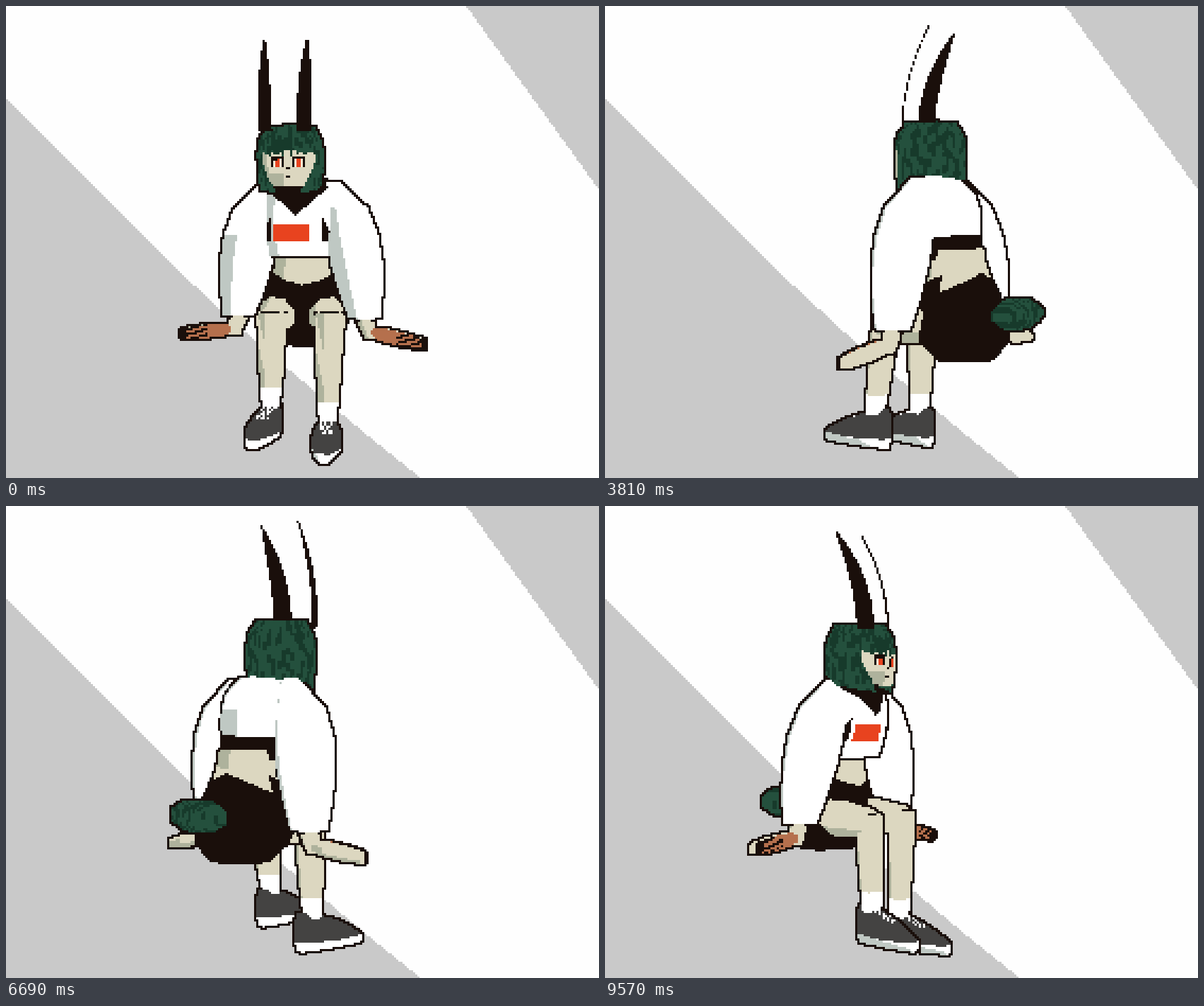
Recreate the animation shown at these times as an HTML page with a canvas. Size 839 px wide and 668 px high, loop 9.67 s.

```html
<!DOCTYPE html>
<html>
<head>
<meta charset="utf-8">
<style>
html, body { margin: 0; width: 100%; height: 100%; overflow: hidden; background: #fff; }
canvas { position: absolute; left: 0; top: 0; width: 840px; height: 669px; image-rendering: pixelated; }
</style>
</head>
<body>
<canvas id="view" width="280" height="223"></canvas>
<script>
const W = 280, H = 223, CELL = 3, LOOP = 9670;
const AXIS = 411, HORIZON = 300, CAMERA = 1700;
const ctx = document.getElementById('view').getContext('2d');
const image = ctx.createImageData(W, H);
const pixels = new Uint32Array(image.data.buffer);
const ids = new Uint8Array(W * H), depth = new Float32Array(W * H);

const rgb = h => (255 << 24 | (h & 255) << 16 | (h >> 8 & 255) << 8 | h >> 16) >>> 0;
const PAPER = rgb(0xfefefe), GREY = rgb(0xc9c9c9), INK = rgb(0x1a0f0b);
const WHITE = rgb(0xffffff), FOLD = rgb(0xbfc8c3), SKIN = rgb(0xdcd7c0), SKIN_DIM = rgb(0xaeb29c);
const HAIR = rgb(0x24503d), HAIR_DIM = rgb(0x173a2b), RED = rgb(0xe8431f);
const SHOE = rgb(0x444342), PALM = rgb(0xb5704d), CREAM = rgb(0xf3ead4);

const { abs, floor, min, max, PI } = Math;
const wave = u => Math.sin(PI * u);
const mix = (a, b, u) => a + (b - a) * u;

function hash(a, b = 0) {
  const v = Math.sin(a * 12.9898 + b * 78.233) * 43758.5453;
  return v - floor(v);
}

// Poses are held on a 30 ms grid, eight to a bar
const bars = [150, 1200, 2250, 3390, 4500, 5610, 6690, 7830, 8940, 9948];
const steps = [0];
for (let i = 0; i < 70; i++) {
  const bar = floor(i / 8);
  steps.push(Math.round(mix(bars[bar], bars[bar + 1], i % 8 / 8) / 30) * 30);
}

const slope = [[0, 132], [243, 374], [350, 472], [508, 605], [587, 668]];
function slopeY(x) {
  let i = 1;
  while (i < slope.length - 1 && x > slope[i][0]) i++;
  const [a, b] = [slope[i - 1], slope[i]];
  return mix(a[1], b[1], (x - a[0]) / (b[0] - a[0]));
}
const backdrop = new Uint32Array(W * H);
for (let i = 0; i < W * H; i++) {
  const x = (i % W + .5) * CELL, y = (floor(i / W) + .5) * CELL;
  backdrop[i] = y > slopeY(x) || y < (x - 651) * 1.383 ? GREY : PAPER;
}

// Rings lie in the plane of two axes
const UP = [[1, 0, 0], [0, 0, 1]];
const FWD = [[1, 0, 0], [0, 1, 0]];
const SIDE = [[0, 0, 1], [0, 1, 0]];
const LIGHT = [.7, -.35, .62];
const EARS = 2;
let sin = 0, cos = 1, part = 0;

function project(x, y, z) {
  const rx = x * cos - z * sin, rz = x * sin + z * cos, s = CAMERA / (CAMERA - rz);
  return { x, y, z, rx, rz,
    sx: (AXIS + rx * s) / CELL, sy: (HORIZON + (y - HORIZON) * s) / CELL };
}

function triangle(a, b, c, paint) {
  const ux = b.rx - a.rx, uy = b.y - a.y, uz = b.rz - a.rz;
  const vx = c.rx - a.rx, vy = c.y - a.y, vz = c.rz - a.rz;
  const nx = uy * vz - uz * vy, ny = uz * vx - ux * vz, nz = ux * vy - uy * vx;
  const glow = (nx * LIGHT[0] + ny * LIGHT[1] + nz * LIGHT[2]) * (nz < 0 ? -1 : 1);
  const lit = glow >= -.1 * Math.hypot(nx, ny, nz);
  const area = (b.sx - a.sx) * (c.sy - a.sy) - (c.sx - a.sx) * (b.sy - a.sy);
  if (abs(area) < 1e-6) return;
  const x0 = max(0, floor(min(a.sx, b.sx, c.sx))), x1 = min(W - 1, floor(max(a.sx, b.sx, c.sx)));
  const y0 = max(0, floor(min(a.sy, b.sy, c.sy))), y1 = min(H - 1, floor(max(a.sy, b.sy, c.sy)));
  for (let y = y0; y <= y1; y++) for (let x = x0; x <= x1; x++) {
    const px = x + .5 - a.sx, py = y + .5 - a.sy;
    const k = (px * (c.sy - a.sy) - (c.sx - a.sx) * py) / area;
    const m = ((b.sx - a.sx) * py - px * (b.sy - a.sy)) / area;
    const l = 1 - k - m;
    if (k < 0 || m < 0 || l < 0) continue;
    const i = y * W + x, z = l * a.rz + k * b.rz + m * c.rz;
    if (z <= depth[i]) continue;
    const color = paint(l * a.x + k * b.x + m * c.x, l * a.y + k * b.y + m * c.y,
      l * a.z + k * b.z + m * c.z, lit);
    if (color === null) continue;
    depth[i] = z;
    ids[i] = part;
    pixels[i] = color;
  }
}

// ring(u) gives x, y, z and the two radii, for u from 0 to 1
function tube(paint, [p, q], count, ring, sides = 8) {
  part++;
  let last = null;
  for (let j = 0; j <= count; j++) {
    const [x, y, z, a, b] = ring(j / count), loop = [];
    for (let i = 0; i < sides; i++) {
      const t = (i + .5) / sides * PI * 2, c = Math.cos(t) * a, s = Math.sin(t) * b;
      loop.push(project(x + p[0] * c + q[0] * s, y + p[1] * c + q[1] * s, z + p[2] * c + q[2] * s));
    }
    const mid = project(x, y, z);
    for (let i = 0; i < sides; i++) {
      const n = (i + 1) % sides;
      if (j === 0 || j === count) triangle(mid, loop[i], loop[n], paint);
      if (last) {
        triangle(last[i], last[n], loop[i], paint);
        triangle(loop[i], last[n], loop[n], paint);
      }
    }
    last = loop;
  }
}

// A straight tube between two rings
const limb = (paint, axes, from, to) =>
  tube(paint, axes, 1, u => from.map((v, i) => mix(v, to[i], u)));

const ink = () => INK;
const skin = (x, y, z, lit) => lit ? SKIN : SKIN_DIM;
const cloth = (x, y, z, lit) => lit ? WHITE : FOLD;

function strands(angle, y) {
  const k = floor(angle * 9);
  return hash(k, floor(y / 11 + hash(k) * 3)) > .58 ? HAIR_DIM : HAIR;
}

function headPaint(x, y, z, lit) {
  const dx = x + 13, angle = Math.atan2(dx, z + 52), off = abs(angle);
  if (y > 246 + (z + 100) * .2) return null;
  const edge = .9 - max(0, y - 222) * .012;
  if (off > edge || y < 204 + hash(floor(dx / 4)) * 9) return strands(angle, y);
  if (y > 254) return null;
  const eye = abs(abs(dx) - 15);
  if (eye < 9 && y > 212 && y < 227) return y < 217 || eye > 6 ? INK : eye < 3.5 ? RED : CREAM;
  if (abs(dx) < 2.5 && y > 228 && y < 231.5) return INK;
  if (abs(dx) < 4 && y > 239 && y < 242.5) return INK;
  return !lit || (y > 236 && dx < -6) ? SKIN_DIM : SKIN;
}

function shirtPaint(x, y, z, lit) {
  const off = abs(x + 4);
  if (z > -75 && y < 297 - off * .9) return INK;
  if (z > -62 && x > -38 && x < 14 && y > 309 && y < 334) return RED;
  if (z > -75 && y > 299 && y < 333 && off > 38 && off < 38 + (y - 298) * .5) return INK;
  if (z < -85 && y > 324) return INK;
  return cloth(x, y, z, lit);
}

function hipPaint(x, y, z, lit) {
  const side = abs(x - 3) * (z < -115 ? .3 : -.15);
  return y > 383 + (z + 115) * .3 + side ? INK : skin(x, y, z, lit);
}

function ear(base, lean, turn) {
  const blade = [[turn * .79, 0, .62], [.62, 0, -turn * .79]];
  tube(ink, blade, 7, u =>
    [base + lean * u, 176 - 140 * u, -19 - 47 * u * u, 12.5 * (1 - u ** 3) + 1, 1.3]);
}

function body() {
  tube(headPaint, UP, 5, u => [-13, 168 + 98 * u, -52, ...Array(2).fill(36 + 14 * wave(u ** .6 * .8))], 10);
  limb(skin, UP, [-11, 240, -58, 13, 13], [-8, 266, -64, 14, 14]);
  tube(shirtPaint, UP, 5, u => [0, 244 + 112 * u, -75 - 9 * u,
    38 + 25 * wave(.83 * u ** .7), 22 + 28 * wave(.76 * u ** .6)], 10);
  tube(hipPaint, UP, 6, u => {
    const swell = 26 * wave(u * u);
    return [3, 342 + 146 * u, -105 - 17 * u, 42 + swell, 36 + swell];
  }, 10);
  tube((x, y) => strands(x / 30, y), FWD, 3, u =>
    [3, 428 - 4 * u, -178 - 50 * u, 27 + 19 * wave(u), 13 + 10 * wave(u)]);
}

function arm(side, cuffZ, tipY, tipZ) {
  tube(cloth, UP, 5, u => {
    const r = 12 + 30 * wave(.85 * u ** .7);
    return [side * (44 + 50 * Math.sqrt(u)), 246 + 200 * u, mix(-75, cuffZ, u), r, r * .95];
  });
  limb(skin, UP, [side * 92, 440, cuffZ, 15, 13], [side * 104, 476, cuffZ, 10, 10]);
  const hand = (x, y, z, lit) => {
    const k = (abs(x) - 98) / 86;
    if (z < mix(cuffZ, tipZ, k) + 2) return skin(x, y, z, lit);
    return k > .9 || (k > .5 && floor(y / 4 + x / 14) % 2 === 0) ? INK : PALM;
  };
  tube(hand, SIDE, 3, u =>
    [side * mix(98, 184, u), mix(466, tipY, u), mix(cuffZ, tipZ, u), 9 + 5 * wave(u), 8 + 3 * wave(u)]);
}

function leg(side, knee, ankle, ay, az, toeOut) {
  const thigh = (x, y, z, lit) => z < -95 + (y - 440) * .7 ? INK : skin(x, y, z, lit);
  limb(thigh, FWD, [side * 31, 440, -110, 33, 32], [knee, 448, -18, 23, 21]);
  const shin = (x, y, z, lit) => y > ay - 18 ? WHITE : skin(x, y, z, lit);
  tube(shin, UP, 3, u => [mix(knee, ankle, u), mix(436, ay + 10, u), mix(-20, az, u), 21 - 8 * u * u, 20 - 6 * u]);
  const shoe = (x, y, z, lit) => {
    const d = z - az, dx = x - ankle - toeOut * d;
    if (y > ay + 42) return cloth(x, y, z, lit);
    const lace = d > 9 && d < 46 && abs(dx) < 9 && y < ay + 30;
    return lace && (floor(y / 4) + floor(dx / 4)) % 2 === 0 ? WHITE : SHOE;
  };
  tube(shoe, FWD, 5, u => {
    const d = -22 + 104 * u, top = 2 + 36 * u ** 1.6;
    return [ankle + toeOut * d, ay + (top + 55) / 2, az + d, 11 + 11 * wave(u), (55 - top) * .54];
  });
}

function outline() {
  for (let y = 1; y < H - 1; y++) for (let x = 1; x < W - 1; x++) {
    const i = y * W + x;
    let edge = false;
    for (let dy = -W; dy <= W; dy += W) for (let dx = -1; dx <= 1; dx++) {
      const n = i + dy + dx;
      if (ids[n] > EARS && ids[n] !== ids[i] && depth[n] - depth[i] > 14) edge = true;
    }
    if (edge) pixels[i] = INK;
  }
}

function draw(t) {
  const phase = t / LOOP, swing = Math.cos(phase * 2 * PI);
  const turn = (5 + 302 * phase + 4 * wave(phase)) * PI / 180;
  const kick = 25 * Math.exp(-(((t - 6690) / 600) ** 2));
  sin = Math.sin(turn);
  cos = Math.cos(turn);
  part = 0;
  pixels.set(backdrop);
  ids.fill(0);
  depth.fill(-1e9);

  ear(9, 1, -1);
  ear(-46, -7, 1);
  body();
  arm(1, -68, 484, -58);
  arm(-1, -98, 475, -105);
  leg(1, 46, 43, 570 + 10 * swing - kick, -8 - 14 * swing, 0);
  leg(-1, -37, -38, 565 - 5 * swing, -14, -.2);
  outline();
  ctx.putImageData(image, 0, 0);
}

let shown = -1;
const begin = performance.now();
function tick() {
  const t = (performance.now() - begin) % LOOP;
  let i = steps.length - 1;
  while (steps[i] > t) i--;
  if (i !== shown) draw(steps[shown = i]);
  requestAnimationFrame(tick);
}
tick();
</script>
</body>
</html>
```
